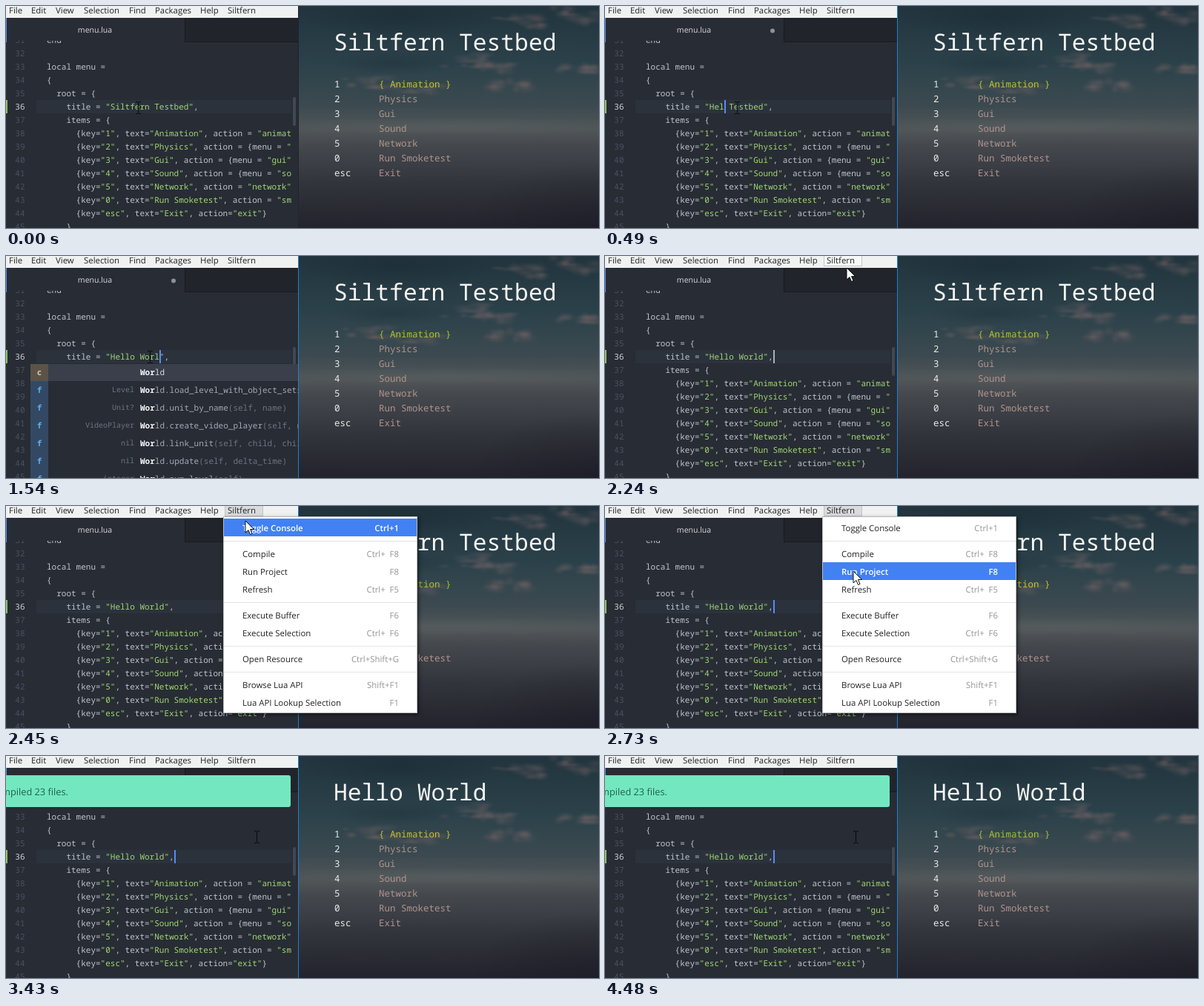
An HTML page with a canvas for the animation above (4550 ms loop, 800 px wide and 300 px high).

```html
<!DOCTYPE html>
<html lang="en">
<head>
<meta charset="utf-8">
<title>Live reload</title>
<style>
  html, body { margin: 0; width: 100%; height: 100%; overflow: hidden; background: #282c34; }
  canvas { display: block; }
</style>
</head>
<body>
<canvas id="stage" width="800" height="300"></canvas>
<script>
const LOOP = 4550, STEP = 70, CHAR = 6.6;
const MONO = '"Noto Sans Mono", monospace', SANS = '"Open Sans", sans-serif';
const CODE = '11px ' + MONO, UI = '11.4px ' + SANS;
const BLUE = '#528bff', INK = '#bec4ce', GREEN = '#9fd675';
const PRODUCT = 'Siltfern';

const ctx = document.getElementById('stage').getContext('2d');
ctx.textRendering = 'geometricPrecision';

function rect(x, y, w, h, color) {
  ctx.fillStyle = color;
  ctx.fillRect(x, y, w, h);
}

function text(str, x, y, color, font = UI, align = 'left') {
  ctx.font = font;
  ctx.textAlign = align;
  ctx.fillStyle = color;
  ctx.fillText(str, x, y);
}

function clipped(x, y, w, h, draw) {
  ctx.save();
  ctx.beginPath();
  ctx.rect(x, y, w, h);
  ctx.clip();
  draw();
  ctx.restore();
}

// Sky, painted once
const sky = document.createElement('canvas');
sky.width = 405;
sky.height = 300;
(function paintSky() {
  const c = sky.getContext('2d');
  const shade = c.createLinearGradient(0, 0, 0, 300);
  [[0, '#22343d'], [.25, '#2b414a'], [.45, '#3c4a50'], [.53, '#4b5356'], [.56, '#505557'],
   [.63, '#44484d'], [.8, '#32343c'], [1, '#22232c']].forEach(s => shade.addColorStop(...s));
  c.fillStyle = shade;
  c.fillRect(0, 0, 405, 300);
  let seed = 7;
  const random = () => (seed = seed * 16807 % 2147483647) / 2147483647;
  function puff(x, y, rx, ry, rgb, alpha) {
    c.save();
    c.translate(x, y);
    c.scale(rx, ry);
    const g = c.createRadialGradient(0, 0, 0, 0, 0, 1);
    g.addColorStop(0, `rgba(${rgb},${alpha})`);
    g.addColorStop(1, `rgba(${rgb},0)`);
    c.fillStyle = g;
    c.fillRect(-1, -1, 2, 2);
    c.restore();
  }
  // x, y, half width, half height
  const clouds = [[228, 74, 32, 9], [252, 82, 34, 7], [285, 107, 28, 6], [90, 104, 32, 7],
                  [366, 12, 34, 11], [300, 22, 32, 8], [375, 86, 26, 5], [160, 112, 34, 5]];
  for (const [x, y, w, h] of clouds)
    for (let i = 0; i < 14; i++)
      puff(x + (random() * 2 - 1) * w, y + (random() * 2 - 1) * h,
           6 + random() * 12, 3 + random() * 5, '126,104,104', .22);
  puff(135, 15, 130, 30, '20,36,44', .35);
  puff(130, 78, 90, 16, '22,40,48', .3);
  puff(205, 162, 260, 12, '120,122,122', .18);
  puff(405, 300, 180, 90, '24,24,34', .45);
})();

const lines = {
  31: [0, 'end'],
  33: [0, 'local menu ='],
  34: [0, '{'],
  35: [2, 'root = {'],
  37: [4, 'items = {'],
  38: [6, '{key="1", text="Animation", action = "animation"}'],
  39: [6, '{key="2", text="Physics", action = {menu = "physics"}'],
  40: [6, '{key="3", text="Gui", action = {menu = "gui"}'],
  41: [6, '{key="4", text="Sound", action = {menu = "sound"}'],
  42: [6, '{key="5", text="Network", action = "network"}'],
  43: [6, '{key="0", text="Run Smoketest", action = "smoketest"}'],
  44: [6, '{key="esc", text="Exit", action="exit"}'],
  45: [4, '}']
};

const titleX = 55 + 4 * CHAR, stringX = titleX + 9 * CHAR;
const typed = (word, t, start, pace) => word.slice(0, Math.max(0, Math.floor((t - start) / pace)));
const world = t => typed('World', t, 1140, 100);

function titleAt(t) {
  if (t < 350) return PRODUCT + ' Testbed';
  if (t < 1260) return typed('Hello', t, 280, 70) + ' Testbed';
  return 'Hello ' + world(t);
}

// Column inside the string and length of the selected word
function selectionAt(t) {
  if (t >= 210 && t < 350) return [0, 8];
  if (t >= 1120 && t < 1260) return [6, 7];
}

function caretX(t) {
  if (t < 70) return null;
  if (t < 210) return 178;
  if (t < 1050) return stringX + typed('Hello', t, 280, 70).length * CHAR;
  if (t < 1120) return 194;
  if (t < 1890) return stringX + (6 + world(t).length) * CHAR;
  if (t > 2300 && (t - 2550 + 800) % 800 >= 400) return null;
  return titleX + 22 * CHAR;
}

function codeLine(str, x, y) {
  let col = 0;
  for (const part of str.split(/("[^"]*")/)) {
    text(part, x + col * CHAR, y, part[0] === '"' ? GREEN : INK, CODE);
    col += part.length;
  }
}

function editor(t) {
  rect(0, 0, 395, 300, '#282c34');
  const selected = selectionAt(t);
  clipped(0, 47, 385, 253, () => {
    if (selected) rect(stringX + selected[0] * CHAR, 127, selected[1] * CHAR, 18, '#3e4451');
    else rect(41, 127, 344, 18, '#2c323b');
    for (let n = 31; n <= 45; n++) {
      const y = 140 + (n - 36) * 18;
      text(n, 25.5, y, n === 36 && !selected ? '#d0d4dc' : '#495162', CODE, 'right');
      if (lines[n]) codeLine(lines[n][1], 55 + lines[n][0] * CHAR, y);
    }
    codeLine(`title = "${titleAt(t)}",`, titleX, 140);
    const x = caretX(t);
    if (x !== null) rect(Math.round(x), 127, 2, 18, t >= 1890 && t < 2300 ? '#a9b0bc' : BLUE);
  });
  rect(0, 127, 2, 18, '#8fbf62');
  ctx.fillStyle = '#414853';
  ctx.beginPath();
  ctx.roundRect(387, 123, 4, 39, 2);
  ctx.fill();

  rect(241, 16, 154, 33, '#21252b');
  rect(241, 16, 1, 33, '#181a1f');
  rect(241, 48, 154, 1, '#181a1f');
  rect(0, 16, 1, 33, '#568af2');
  text('menu.lua', 120, 36, '#d7dae0', '10.5px ' + SANS, 'center');
  if (t >= 350 && t < 1960) {
    ctx.fillStyle = '#8b919c';
    ctx.beginPath();
    ctx.arc(226, 33.5, 3, 0, 7);
    ctx.fill();
  }
}

const completions = [
  ['', '', ''], ['Level', '.load_level_with_object_sets', '(self)'], ['Unit?', '.unit_by_name', '(self, name)'],
  ['VideoPlayer', '.create_video_player', '(self, name)'], ['nil', '.link_unit', '(self, child, child_node)'],
  ['nil', '.update', '(self, delta_time)'], ['integer', '.num_level', '(self)']
];

function popup(t) {
  const bold = Math.max(1, Math.min(3, world(t).length - 1));
  clipped(33, 146, 362, 154, () => {
    rect(33, 146, 362, 154, '#282c34');
    rect(33, 146, 362, 23, '#3a3f4b');
    completions.forEach(([type, name, args], i) => {
      const y = 161 + i * 24;
      rect(33, i ? 145 + i * 24 : 146, 24, i ? 24 : 23, i ? '#334963' : '#5b5348');
      text(i ? 'f' : 'c', 45, y, i ? '#61afef' : '#d8c9ab', 'bold ' + CODE, 'center');
      text(type, 173, y - 1, '#6d7481', '10px ' + MONO, 'right');
      text('World'.slice(0, bold), 181, y, '#f0f2f5', 'bold ' + CODE);
      text('World'.slice(bold) + name, 181 + bold * CHAR, y, i ? '#a3aab6' : '#d7dae0', CODE);
      text(args, 181 + (5 + name.length) * CHAR, y, '#6d7481', CODE);
    });
  });
}

function notification(t) {
  const p = Math.min(1, (t - 3220) / 210);
  ctx.save();
  ctx.globalAlpha = p;
  ctx.translate(0, (p - 1) * 20);
  ctx.fillStyle = '#73e8c0';
  ctx.beginPath();
  ctx.roundRect(-10, 26, 394, 43, 3);
  ctx.fill();
  text('Compiled 23 files.', 84, 53, '#22614c', '12.8px ' + SANS, 'right');
  ctx.restore();
}

const menuBar = [['File', 4], ['Edit', 34], ['View', 67], ['Selection', 105], ['Find', 166],
                 ['Packages', 201], ['Help', 262], [PRODUCT, 299]];

function topBar(t) {
  rect(0, 0, 395, 16, '#f0f1f1');
  if (t >= 2240 && t < 3080) {
    rect(295, -1, 52, 15, '#c4c6c8');
    rect(296, 0, 50, 13, menuOpen(t) ? '#d9dbdd' : '#f6f7f7');
  }
  menuBar.forEach(([label, x]) => text(label, x, 10, '#222'));
}

const menuItems = [
  [30, 'Toggle Console', 'Ctrl+1'], [65, 'Compile', 'Ctrl+  F8'], [89, 'Run Project', 'F8'],
  [113, 'Refresh', 'Ctrl+  F5'], [148, 'Execute Buffer', 'F6'], [172, 'Execute Selection', 'Ctrl+  F6'],
  [207, 'Open Resource', 'Ctrl+Shift+G'], [242, 'Browse Lua API', 'Shift+F1'], [266, 'Lua API Lookup Selection', 'F1']
];
const menuOpen = t => t >= 2380 && t < 3010;

function dropdown(pointerY) {
  ctx.save();
  ctx.shadowColor = 'rgba(0,0,0,.5)';
  ctx.shadowBlur = 5;
  ctx.shadowOffsetX = ctx.shadowOffsetY = 2;
  rect(293, 14, 262, 266, '#bbb');
  ctx.restore();
  rect(294, 15, 260, 264, '#fff');
  for (const y of [47, 130, 189, 224]) rect(294, y, 260, 1, '#e4e4e4');
  for (const [y, label, keys] of menuItems) {
    const active = Math.abs(pointerY - y) <= 12;
    if (active) rect(294, y - 13, 260, 24, '#4281f4');
    text(label, 319, y + 4, active ? '#fff' : '#222', (active ? '600 ' : '') + UI);
    text(keys, 530, y + 4, active ? '#fff' : '#959595', (active ? '600 ' : '') + UI, 'right');
  }
}

const entries = [['1', '{ Animation }'], ['2', 'Physics'], ['3', 'Gui'], ['4', 'Sound'],
                 ['5', 'Network'], ['0', 'Run Smoketest'], ['esc', 'Exit']];

function game(t) {
  ctx.drawImage(sky, 395, 0);
  text(t < 3430 ? PRODUCT + ' Testbed' : 'Hello World', 442, 60, '#f3f4f2', '31.3px ' + MONO);
  const hue = 67 - 8 * Math.cos((t - 2730) / 700 * 2 * Math.PI);
  entries.forEach(([key, label], i) => {
    const y = 110 + i * 20, font = '12.5px ' + MONO;
    text(key, 443, y, '#e9eaea', font);
    text(label, 503, y, i ? '#b0938c' : `hsl(${hue} 66% 46%)`, font);
  });
  rect(394, 0, 1, 300, t < 70 ? '#20252c' : '#1c7fd0');
}

// time, x, y
const path = [[0, 178, 137], [700, 178, 137], [980, 194, 136], [1960, 194, 136], [2240, 326, 16], [2310, 321, 8],
              [2400, 321, 8], [2730, 335, 88], [2940, 337, 96], [3010, 338, 109], [LOOP, 338, 109]];

function pointerAt(t) {
  const i = path.findIndex(p => p[0] > t), [t0, x0, y0] = path[i - 1], [t1, x1, y1] = path[i];
  const p = (t - t0) / (t1 - t0);
  return [Math.round(x0 + (x1 - x0) * p), Math.round(y0 + (y1 - y0) * p)];
}

function pointer(x, y, arrow) {
  if (!arrow) {
    rect(x, y - 7, 1, 15, '#08090b');
    for (const dy of [-8, 8]) {
      rect(x - 3, y + dy, 3, 1, '#08090b');
      rect(x + 1, y + dy, 3, 1, '#08090b');
    }
    return;
  }
  ctx.beginPath();
  [[0, 0], [0, 16], [4, 12.5], [6.5, 18.5], [9, 17.5], [6.5, 11.5], [11.5, 11.5]]
    .forEach(([dx, dy]) => ctx.lineTo(x + dx, y + dy));
  ctx.closePath();
  ctx.fillStyle = '#fff';
  ctx.fill();
  ctx.strokeStyle = '#111';
  ctx.lineWidth = 1;
  ctx.stroke();
}

function draw(now) {
  const t = Math.floor(now % LOOP / STEP) * STEP;
  const [x, y] = pointerAt(t);
  editor(t);
  if (t >= 1260 && t < 1890) popup(t);
  if (t >= 3290) notification(t);
  topBar(t);
  game(t);
  if (menuOpen(t)) dropdown(y);
  pointer(x, y, y < 49 || menuOpen(t));
}

const start = performance.now();
(function frame() {
  draw(performance.now() - start);
  requestAnimationFrame(frame);
})();
</script>
</body>
</html>
```
